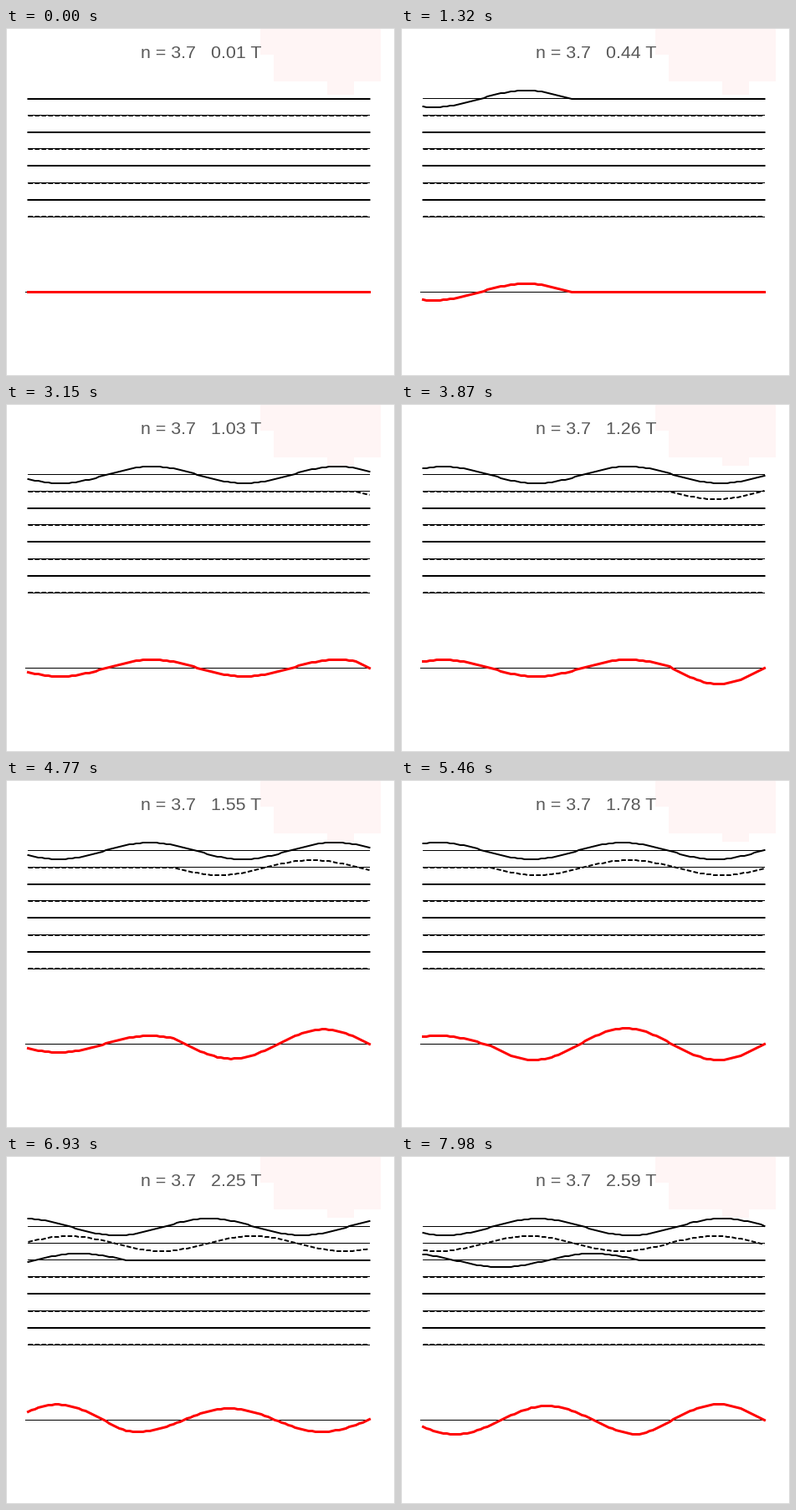
A matplotlib script for the animation above (8000 ms loop, 465 by 417 pixels).

```python
import numpy as np
import matplotlib.pyplot as plt
from matplotlib.animation import FuncAnimation
from matplotlib.patches import Rectangle

W, H, DPI = 465, 417, 100
PX = 72 / DPI              # one pixel in points
LOOP, TICK, STEP = 8000, 20, 30

LEFT, RIGHT = 26.5, 434.5
N = 101                    # wave steps along the string
MODE = 3.7                 # half wavelengths along the string
AMP, LOSS = 10, 0.9
ROWS = [85, 105, 125, 145, 165, 186, 206, 226]
AXES = [84, 104, 124, 144, 164, 185, 205, 226]
SUM_Y = 316.5

fig = plt.figure(figsize=(W / DPI, H / DPI), dpi=DPI, facecolor="white")
ax = fig.add_axes([0, 0, 1, 1])
ax.set_xlim(0, W)
ax.set_ylim(H, 0)
ax.axis("off")


def box(x, y, w, h, color):
    patch = Rectangle((x, y), w, h, fc=color, lw=0, antialiased=False)
    ax.add_patch(patch)
    return patch


def line(x, y, width, color="black", **kw):
    return ax.plot(x, y, color=color, lw=width * PX, snap=False,
                   solid_joinstyle="round", dash_joinstyle="round", **kw)[0]


PINK, FRAME = "#fff5f5", "#d9d9d9"
box(304, 0, 144, 32, PINK)
box(320, 32, 128, 32, PINK)
tab = box(384, 64, 32, 16, PINK)
for edge in [(0, 0, W, 1), (0, H - 1, W, 1), (0, 0, 1, H), (W - 1, 0, 1, H)]:
    box(*edge, FRAME)

for y in AXES:
    box(26, y, 409, 1, "black")
box(23, 316, 412, 1, "black")

u = np.linspace(0, 1, N + 1)
xs = LEFT + (RIGHT - LEFT) * u
waves = []
for j, y in enumerate(ROWS):
    style = {"dashes": (2.8, 1.2), "dash_capstyle": "butt"} if j % 2 else {}
    waves.append(line(xs, np.full_like(xs, y), 2, **style))
total = line(xs, np.full_like(xs, SUM_Y), 3, "red")

title = ax.text(233, 36, "", color="#595959", family="Liberation Sans",
                size=21.4 * PX, ha="center", va="baseline")


def passage(j, d):
    """Displacement of the j-th pass along the string at travelled distance d."""
    behind = d - j - (1 - u if j % 2 else u)
    wave = np.sin(MODE * np.pi * np.maximum(behind, 0))
    return AMP * (-LOSS) ** j * wave


def draw(i):
    k = (i * TICK + TICK // 2) // STEP
    d = k / N
    parts = [passage(j, d) for j in range(len(ROWS))]
    for ln, y, p in zip(waves, ROWS, parts):
        ln.set_ydata(y - np.round(p))
    total.set_ydata(SUM_Y - np.round(sum(parts)))
    tab.set_height(16 if d < 0.88 else 10)
    title.set_text(f"n = {MODE}   {round((k + 1) / 103, 2):g} T")
    return [*waves, total, tab, title]


anim = FuncAnimation(fig, draw, frames=LOOP // TICK, interval=TICK,
                     repeat=True, repeat_delay=0, blit=False)
plt.show()
```
